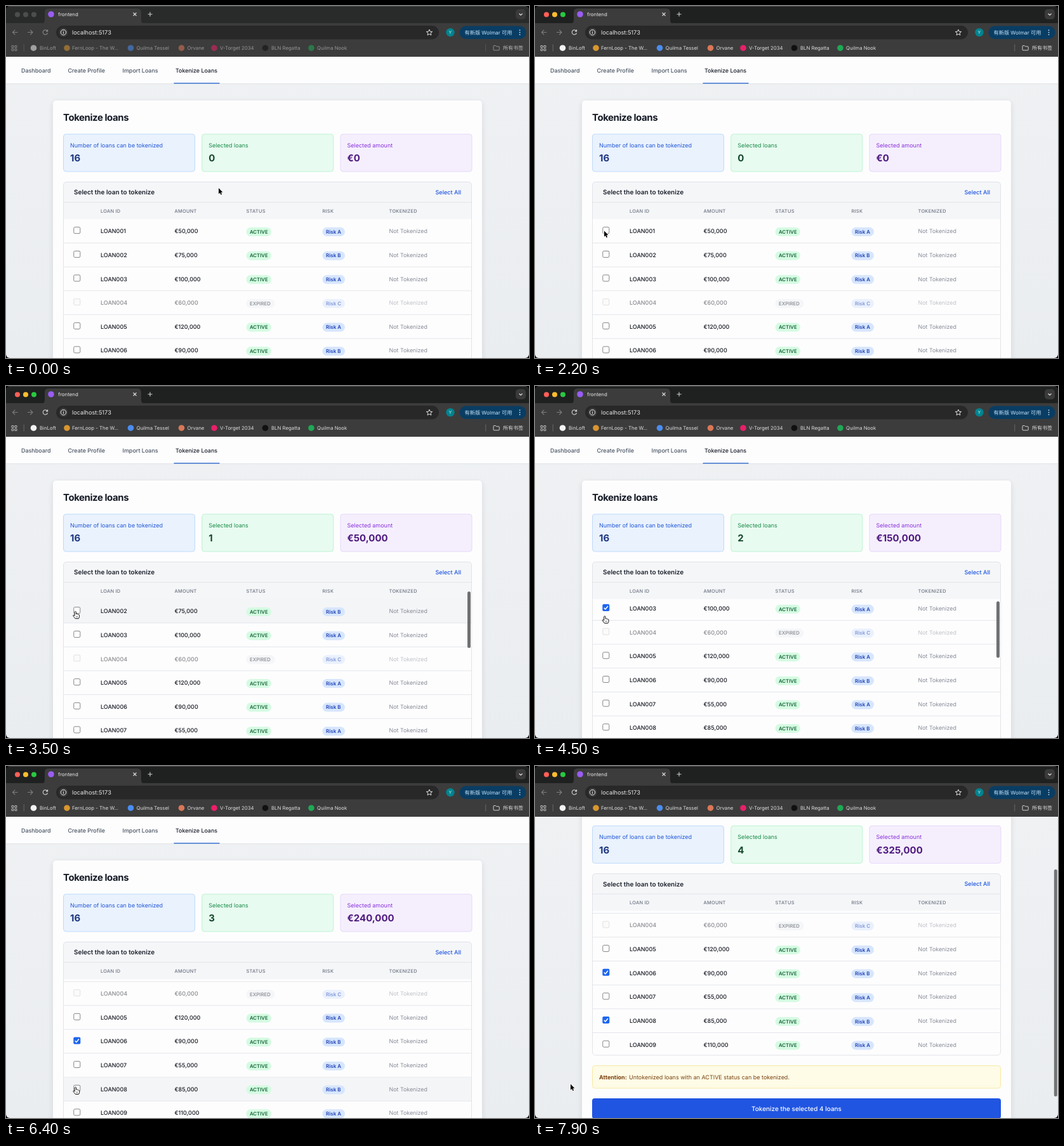
Recreate the animation shown at these times as an HTML page with a canvas. Size 824 by 555 pixels, loop 8 s.

```html
<!DOCTYPE html>
<html lang="en">
<head>
<meta charset="utf-8">
<title>Tokenize loans</title>
<style>
html, body { margin: 0; width: 100%; height: 100%; overflow: hidden; background: #000; }
canvas { display: block; width: 824px; height: 555px; }
</style>
</head>
<body>
<canvas id="stage"></canvas>
<script>
const W = 824, H = 555, LOOP = 8000;
const canvas = document.getElementById('stage');
const ratio = window.devicePixelRatio || 1;
canvas.width = Math.round(W * ratio);
canvas.height = Math.round(H * ratio);
const c = canvas.getContext('2d');
const FONT = 'Inter, "Noto Sans CJK SC", "Noto Sans CJK", sans-serif';

const ROW = 37.65, LIST_TOP = 336, LIST_END = 564.2;
const AMOUNTS = [50, 75, 100, 60, 120, 90, 55, 85, 110];
const RISKS = 'ABACABABA';
const EXPIRED = 3;
const FOCUS = 2100, HOVER = 2300;

// loan index and the moment it is ticked
const PICKS = [[0, 2500], [2, 4150], [5, 5650], [7, 6600]];
const LIST_SCROLL = [[2800, 0], [3300, 37.65], [3650, 37.65], [4000, 75.3],
  [4400, 75.3], [4850, 107.7], [4950, 107.7], [5100, 109]];
const PAGE_SCROLL = [[7520, 0], [7880, 107.7]];
const POINTER = [[1000, 335, 287], [2000, 109, 354.5], [4350, 109.5, 355.5], [4850, 111, 388],
  [5050, 111, 388], [5500, 110, 430], [5800, 110, 430], [6300, 109.5, 506],
  [6800, 109.5, 506], [7350, 56, 501.5]];

function track(keys, t, k = 1) {
  if (t <= keys[0][0]) return keys[0][k];
  for (let i = 1; i < keys.length; i++) {
    const a = keys[i - 1], b = keys[i];
    if (t < b[0]) {
      const p = (t - a[0]) / (b[0] - a[0]);
      return a[k] + (b[k] - a[k]) * p * p * (3 - 2 * p);
    }
  }
  return keys[keys.length - 1][k];
}

function text(s, x, y, size, color, weight = 400, spacing = 0, align = 'left') {
  c.font = `${weight} ${size}px ${FONT}`;
  c.letterSpacing = spacing + 'px';
  c.textAlign = align;
  c.fillStyle = color;
  c.fillText(s, x, y);
}

function box(x, y, w, h, r, fill, stroke, line = 1) {
  c.beginPath();
  c.roundRect(x, y, w, h, r);
  if (fill) { c.fillStyle = fill; c.fill(); }
  if (stroke) { c.strokeStyle = stroke; c.lineWidth = line; c.stroke(); }
}

function rect(x, y, w, h, fill) {
  c.fillStyle = fill;
  c.fillRect(x, y, w, h);
}

function dot(x, y, r, fill) {
  c.beginPath();
  c.arc(x, y, r, 0, 7);
  c.fillStyle = fill;
  c.fill();
}

function path(d, stroke, line = 1, fill) {
  const p = new Path2D(d);
  if (fill) { c.fillStyle = fill; c.fill(p); }
  if (stroke) {
    c.strokeStyle = stroke;
    c.lineWidth = line;
    c.stroke(p);
  }
}

function tabStrip(focused) {
  rect(0, 0, W, 28, focused ? '#1f2020' : '#292a2a');
  rect(0, 0, W, 1, '#4b4b4b');
  const lights = focused ? ['#fe5f57', '#febc2e', '#28c840'] : ['#4c4d4d', '#4c4d4d', '#4c4d4d'];
  lights.forEach((col, i) => dot(18 + 13 * i, 13.5, 4, col));
  path('M55 28Q61 28 61 22V10Q61 4 67 4H207Q213 4 213 10V22Q213 28 219 28Z', null, 0, '#3c3c3c');
  dot(71, 13, 4.8, '#9a5cf5');
  text('frontend', 82, 16, 7.9, '#e6e6e6');
  path('M200.5 10.5l5 5m0-5l-5 5', '#dcdcdc', 1.1);
  path('M223.5 13h7m-3.5-3.5v7', '#d0d0d0', 1.1);
  box(803, 5, 16, 16, 5, '#3a3a3a');
  path('M808.5 12l2.5 2.5l2.5-2.5', '#e0e0e0', 1.2);
}

function addressBar(focused) {
  const bright = focused ? '#d4d4d4' : '#8a8a8a';
  rect(0, 27, W, 53, '#3c3c3c');
  path('M18.5 41.5H10.5m3.8-3.8l-3.8 3.8l3.8 3.8', '#7d7d7d', 1.1);
  path('M34 41.5h8m-3.8-3.8l3.8 3.8l-3.8 3.8', '#7d7d7d', 1.1);
  path('M65 39.3A3.7 3.7 0 1 0 65.5 42.5M65.6 37.3v2.6h-2.6', bright, 1.1);

  box(79, 31, 603, 21.5, 10.75, '#282828');
  dot(90.5, 41.6, 7, '#3c3c3c');
  c.beginPath();
  c.arc(90.5, 41.6, 4.2, 0, 7);
  c.strokeStyle = '#e3e3e3';
  c.lineWidth = 1;
  c.stroke();
  rect(90, 41, 1, 2.8, '#e3e3e3');
  rect(90, 39.2, 1, 1, '#e3e3e3');
  text('localhost:5173', 104, 44.9, 9.2, '#e8e8e8');

  c.beginPath();
  for (let i = 0; i < 10; i++) {
    const r = i % 2 ? 2.2 : 5, a = -Math.PI / 2 + i * Math.PI / 5;
    c.lineTo(667 + r * Math.cos(a), 42 + r * Math.sin(a));
  }
  c.closePath();
  c.strokeStyle = '#dedede';
  c.lineWidth = 1;
  c.stroke();

  dot(700, 41.6, 6.7, '#00838f');
  text('Y', 700, 44.2, 7, '#d5eef0', 400, 0, 'center');
  box(714.5, 31.5, 105, 20.5, 10.25, '#0a3d63');
  text('有新版 Wolmar 可用', 722.5, 44.7, 8.2, '#c6e4fb');
  for (let i = -1; i < 2; i++) dot(809.5, 41.6 + 3.5 * i, 0.9, '#d6ecfc');
}

const BOOKMARKS = [
  ['BinLoft', 43.5, 53, '#f2f2f2'],
  ['FernLoop - The W...', 96, 104, '#d9962f'],
  ['Quilma Tessel', 196.5, 205.5, '#4a8df0'],
  ['Orvane', 276.5, 285.5, '#d97757'],
  ['V-Torget 2034', 328, 337, '#ea1f69'],
  ['BLN Regatta', 408.5, 418, '#101010'],
  ['Quilma Nook', 481, 490, '#1fa855']
];

function bookmarks(focused) {
  c.save();
  c.globalAlpha = focused ? 1 : 0.55;
  for (const x of [8.5, 13.5])
    for (const y of [62, 67]) box(x + 0.5, y + 0.5, 3, 3, 0.3, null, '#d0d0d0', 0.9);
  rect(27.7, 60.5, 1, 11, '#696969');
  for (const [name, icon, x, col] of BOOKMARKS) {
    dot(icon, 66.2, 4.8, col);
    text(name, x, 69, 7.8, '#dedede');
  }
  rect(755.3, 60.5, 1, 11, '#696969');
  path('M768 63.3q0-.8.8-.8h2.6l1.2 1.3h3.8q.8 0 .8.8v4.4q0 .8-.8.8h-7.6q-.8 0-.8-.8Z', '#d0d0d0', 1);
  c.globalAlpha = focused ? 1 : 0.8;
  text('所有书签', 783, 69, 8, '#dedede');
  c.restore();
}

function stat(x, label, value, bg, edge, ink, strong) {
  box(x + 0.5, 202, 207, 59, 4, bg, edge);
  text(label, x + 11, 222.7, 9, ink);
  text(value, x + 11, 245.3, 15, strong, 700);
}

function checkbox(y, on, off) {
  if (on) {
    box(106.3, y - 5.5, 11, 11, 2, '#1c65f0');
    path(`M108.7 ${y + 0.2}l2.2 2.3l4-5`, '#fff', 1.5);
  } else {
    box(106.8, y - 5, 10, 10, 1.8, off ? '#f7f7f8' : '#fff', off ? '#c0c1c3' : '#77787a', 0.9);
  }
}

function loanRow(i, y, on, hover) {
  const off = i === EXPIRED;
  if (hover) rect(90, y, 644, ROW, '#f4f5f7');
  c.save();
  if (off) c.globalAlpha = 0.5;
  checkbox(y + 17.7, on, off);
  text('LOAN00' + (i + 1), 149, y + 22.2, 9, '#15181f', 500);
  text('€' + AMOUNTS[i] + ',000', 265.5, y + 22.2, 9, '#15181f', 500);
  box(378.5, y + 13, off ? 45 : 39.5, 14, 7, off ? '#eef0f3' : '#d5fbe2');
  text(off ? 'EXPIRED' : 'ACTIVE', 384, y + 22.8, 7.75, off ? '#2f3540' : '#17653a', 600);
  box(498.5, y + 13, 35.5, 14, 7, '#d7e6fd');
  text('Risk ' + RISKS[i], 504, y + 22.8, 8, '#1f43b5', 600);
  text('Not Tokenized', 603.5, y + 22.2, 8.9, '#858a94');
  c.restore();
  rect(90, y + ROW - 0.5, 644, 1, '#e4e6ea');
}

function loanList(t, px, py) {
  const scroll = track(LIST_SCROLL, t);
  const bar = t < 2800 ? 0 : Math.max(0, Math.min(1, (5850 - t) / 250));
  const scrolling = t > 4400 && t < 5100;

  c.save();
  c.beginPath();
  c.roundRect(90, 277, 644, LIST_END - 277, 5);
  c.clip();
  rect(90, 277, 644, 59, '#f5f6f8');
  rect(90, 309, 644, 1, '#e2e5e9');
  text('Select the loan to tokenize', 107, 297.2, 10, '#1b212c', 600);
  text('Select All', 676.5, 296.8, 9.1, '#1f56e0', 500);
  [['LOAN ID', 149], ['AMOUNT', 265.5], ['STATUS', 378.5], ['RISK', 498.5], ['TOKENIZED', 603.5]]
    .forEach(([s, x]) => text(s, x, 326, 7.4, '#6b7280', 500, 0.28));

  c.save();
  c.beginPath();
  c.rect(90, LIST_TOP, 644, LIST_END - LIST_TOP);
  c.clip();
  const live = t > HOVER && !scrolling && px > 90 && py > LIST_TOP;
  const over = live ? Math.floor((py + scroll - LIST_TOP) / ROW) : -1;
  for (let i = 0; i < AMOUNTS.length; i++) {
    const on = PICKS.some(([n, at]) => n === i && t >= at);
    loanRow(i, LIST_TOP + i * ROW - scroll, on, i === over && i !== EXPIRED);
  }
  c.restore();

  if (bar > 0) {
    c.globalAlpha = bar;
    box(727, 310 + scroll * 0.371, 5, 89, 2.5, '#707172');
    c.globalAlpha = 1;
  }
  c.restore();
  box(90.5, 277.5, 643, LIST_END - 278, 5, null, '#e0e3e7');
}

function page(t, px, py) {
  const scroll = track(PAGE_SCROLL, t);
  const picked = PICKS.filter(p => t >= p[1]);
  const sum = picked.reduce((s, p) => s + AMOUNTS[p[0]], 0);

  c.save();
  c.beginPath();
  c.rect(0, 80, W, H - 80);
  c.clip();
  const bg = c.createLinearGradient(0, 80, 0, H);
  bg.addColorStop(0, '#eff1f3');
  bg.addColorStop(1, '#eaedf0');
  rect(0, 80, W, H, bg);
  c.translate(0, -scroll);

  rect(0, 80, W, 42.5, '#fdfdfe');
  rect(0, 122, W, 1, '#dfe2e6');
  [['Dashboard', 24], ['Create Profile', 97.5], ['Import Loans', 183.5]]
    .forEach(([s, x]) => text(s, x, 105, 8.95, '#4b5563', 500));
  text('Tokenize Loans', 267, 105, 8.9, '#161b26', 500);
  rect(264.5, 121, 72, 1.5, '#3f74cf');

  c.save();
  c.shadowColor = 'rgba(20,30,50,.13)';
  c.shadowBlur = 8 * ratio;
  c.shadowOffsetY = 3 * ratio;
  box(74, 149, 676, 545, 5, '#fdfdfe');
  c.restore();

  text('Tokenize loans', 90, 181, 15, '#161b26', 700, -0.45);
  stat(90, 'Number of loans can be tokenized', '16', '#e9f2fd', '#bfdafb', '#2056d8', '#1d3680');
  stat(308.3, 'Selected loans', String(picked.length), '#e8fbf0', '#bdf2d1', '#198a49', '#144a2b');
  stat(526.5, 'Selected amount', '€' + (sum ? sum + ',000' : '0'), '#f5effd', '#e6d7fa', '#8a31dd', '#4f1a80');
  loanList(t, px, py + scroll);

  box(90.5, 580.2, 643, 35.5, 4, '#fefbe6', '#f8e9a4');
  text('Attention:', 101, 601.3, 9, '#78420f', 700);
  text('Untokenized loans with an ACTIVE status can be tokenized.', 148, 601.3, 9, '#78420f');
  box(90, 631.7, 644, 32, 4, '#2055e2');
  text(`Tokenize the selected ${picked.length} loans`, 412, 651.3, 10, '#fff', 500, 0, 'center');
  c.restore();

  if (t > PAGE_SCROLL[0][0]) box(817.8, 82 + scroll * 0.752, 5, 358, 2.5, '#727374');
}

function pointer(t, x, y) {
  c.save();
  c.translate(x, y);
  c.lineJoin = 'round';
  if (t > HOVER && x > 90) {
    path('M-1.2 1Q0-.8 1.2 1V4.3Q2.3 3.5 3 4.7Q4.2 4 4.8 5.2Q6 4.8 6.2 6.4V8.4Q6 10 5 11.5H-.2Q-1.8 9.5-3.6 7.2Q-3.6 5.6-2.2 6.2L-1.2 7.1Z',
      '#111', 1, '#fff');
    path('M1.4 7.3v2.5m1.7-2.5v2.5', '#333', 0.6);
  } else {
    const arrow = 'M0 0V9.3L2.1 7.4L3.6 10.7L5.1 10L3.7 6.8H6.5Z';
    path(arrow, '#fff', 1.6);
    path(arrow, null, 0, '#050505');
  }
  c.restore();
}

function draw(t) {
  c.setTransform(canvas.width / W, 0, 0, canvas.height / H, 0, 0);
  c.textRendering = 'geometricPrecision';
  rect(0, 0, W, H, '#000');
  c.save();
  c.beginPath();
  c.roundRect(0, 0, W, H, 6);
  c.clip();
  const focused = t >= FOCUS;
  const x = track(POINTER, t, 1), y = track(POINTER, t, 2);
  page(t, x, y);
  tabStrip(focused);
  addressBar(focused);
  bookmarks(focused);
  pointer(t, x, y);
  c.restore();
}

const start = performance.now();
function tick() {
  draw((performance.now() - start) % LOOP);
  requestAnimationFrame(tick);
}
tick();
</script>
</body>
</html>
```
